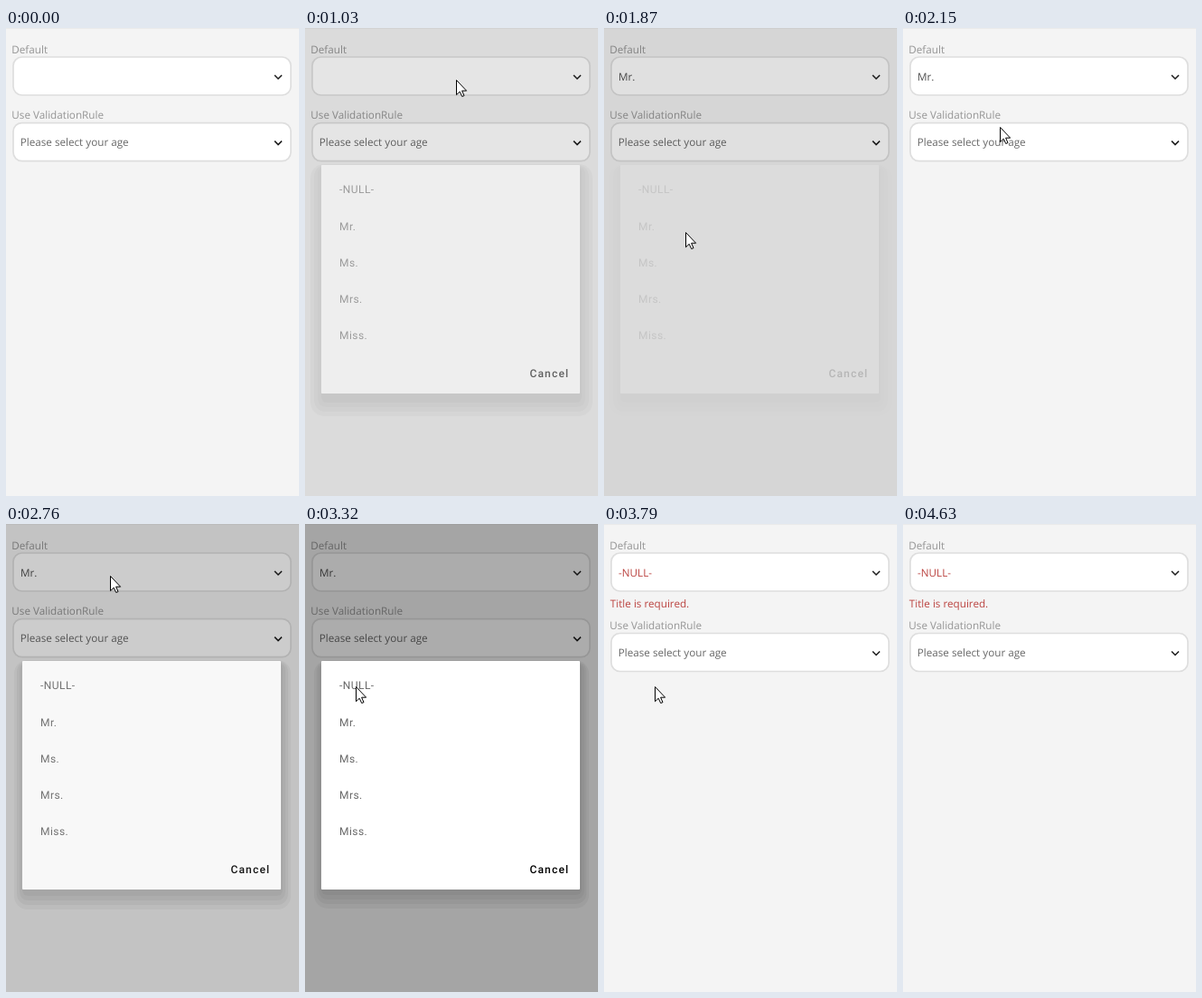
Write an HTML page that moves like this. It is 324x516 px and loops after 6020 ms.

```html
<!DOCTYPE html>
<html lang="en">
<head>
<meta charset="utf-8">
<title>Title picker</title>
<style>
  html, body { margin: 0; width: 100%; height: 100%; overflow: hidden; background: #f4f4f4; }
  svg { display: block; }
  text { font: 11.7px "Open Sans", sans-serif; white-space: pre; text-rendering: geometricPrecision; }
  .label { fill: #959595; }
  .hint { fill: #686868; }
  .error { fill: #bb4441; }
  .box { fill: #fff; stroke: #dedede; stroke-width: 1.7; }
  .chevron { fill: none; stroke: #1c1c1c; stroke-width: 1.5; }
  .item { font: 12px Roboto, sans-serif; letter-spacing: .45px; fill: #686868; }
  .cancel { font: 500 12px Roboto, sans-serif; letter-spacing: 1.2px; fill: #000; }
</style>
</head>
<body>
<svg width="324" height="516" viewBox="0 0 324 516">
  <defs>
    <g id="select">
      <rect class="box" x="8" y="32" width="307" height="42" rx="9.5"/>
      <path class="chevron" d="M297 52l4 4 4-4"/>
    </g>
  </defs>
  <rect width="324" height="516" fill="#f4f4f4"/>
  <rect width="324" height="1" fill="#eaeaea"/>

  <text class="label" x="6.3" y="27.8">Default</text>
  <use href="#select"/>
  <text id="value" x="16" y="57.7"></text>
  <text id="error" class="error" x="6.8" y="91.8">Title is required.</text>
  <g id="ageField">
    <text class="label" x="6.3" y="100">Use ValidationRule</text>
    <use href="#select" y="72.6"/>
    <text class="hint" x="15.7" y="130">Please select your age</text>
  </g>

  <rect id="dim" width="324" height="516"/>
  <g id="dialog">
    <g id="shadow"></g>
    <rect x="18" y="151" width="286" height="252" rx="1" fill="#fff"/>
    <g id="items"></g>
    <text class="cancel" x="248.4" y="385.3">Cancel</text>
  </g>
  <path id="cursor" d="M.5.5V16.7L4.2 13.2 6.7 18.5 9 17.6 6.6 12.2H11.6Z"
        fill="#fff" stroke="#000" stroke-linejoin="round"/>
</svg>
<script>
const LOOP = 6020, STEP = 46.75;   // ms
const byId = id => document.getElementById(id);
const set = (id, attributes) => {
  for (const [name, value] of Object.entries(attributes)) byId(id).setAttribute(name, value);
};
const clamp = p => Math.min(1, Math.max(0, p));
const easeOut = p => 1 - (1 - p) ** 2;
const linear = p => p;

byId('items').innerHTML = ['-NULL-', 'Mr.', 'Ms.', 'Mrs.', 'Miss.']
  .map((name, i) => `<text class="item" x="38" y="${182.4 + 40.25 * i}">${name}</text>`).join('');

// All times below are in steps
const dialogs = [{ open: 22, close: 39 }, { open: 58, close: 78 }];
const choose = { title: 39, none: 79 };
const enter = { step: 5, x: 28, y: 409 };
const leaveStep = 99;
const moves = [
  { start: 5, end: 15, x: 167, y: 57, ease: easeOut },
  { start: 24, end: 34, x: 90, y: 225, ease: easeOut },
  { start: 42, end: 51, x: 115, y: 57, ease: easeOut },
  { start: 60, end: 71, x: 56, y: 179, ease: easeOut },
  { start: 96, end: 98, x: 22, y: 291, ease: linear }
];

function cursorAt(step) {
  let { x, y } = enter;
  for (const move of moves) {
    const p = move.ease(clamp((step - move.start) / (move.end - move.start)));
    x += (move.x - x) * p;
    y += (move.y - y) * p;
  }
  return [Math.round(x), Math.round(y)];
}

function dialogAt(step) {
  const fade = since => clamp(.31 * (step - since + 1));
  const current = dialogs.find(d => step >= d.open && step <= d.close + 3);
  if (!current) return { dim: 0, alpha: 0 };
  const left = 1 - fade(current.close);
  if (left < 1) return { dim: left, alpha: left ** 2 };
  const shown = fade(current.open);
  return { dim: shown, alpha: easeOut(clamp(shown * 1.07)) };
}

// Stacked rounded layers, tighter towards the dialog
function shadowLayers(spread) {
  return [0, 1, 2, 3].map(i => {
    const side = spread * (1 - i / 3);
    return `<rect x="${18 - side}" y="${150 + i}" width="${288 + 2 * side}"
      height="${266 + spread - 6 * i}" rx="${15 - 3 * i}" opacity=".043"/>`;
  }).join('');
}

function draw(time) {
  const step = Math.floor((Math.floor(time / 10) + .5) / (STEP / 10));

  const invalid = step >= choose.none;
  byId('value').textContent = invalid ? '-NULL-' : step >= choose.title ? 'Mr.' : '';
  set('value', { fill: invalid ? '#bb4441' : '#505050' });
  set('error', { visibility: invalid ? 'visible' : 'hidden' });
  set('ageField', { transform: `translate(0 ${invalid ? 15.9 : 0})` });

  const { dim, alpha } = dialogAt(step);
  set('dim', { opacity: .325 * dim });
  set('dialog', { opacity: alpha });
  byId('shadow').innerHTML = shadowLayers(Math.min(12, 8 + 9 * (1 - alpha)));

  const visible = step >= enter.step && step < leaveStep;
  set('cursor', {
    visibility: visible ? 'visible' : 'hidden',
    transform: `translate(${cursorAt(step)})`
  });
}

const start = performance.now();
function tick() {
  draw((performance.now() - start) % LOOP);
  requestAnimationFrame(tick);
}
tick();
</script>
</body>
</html>
```
